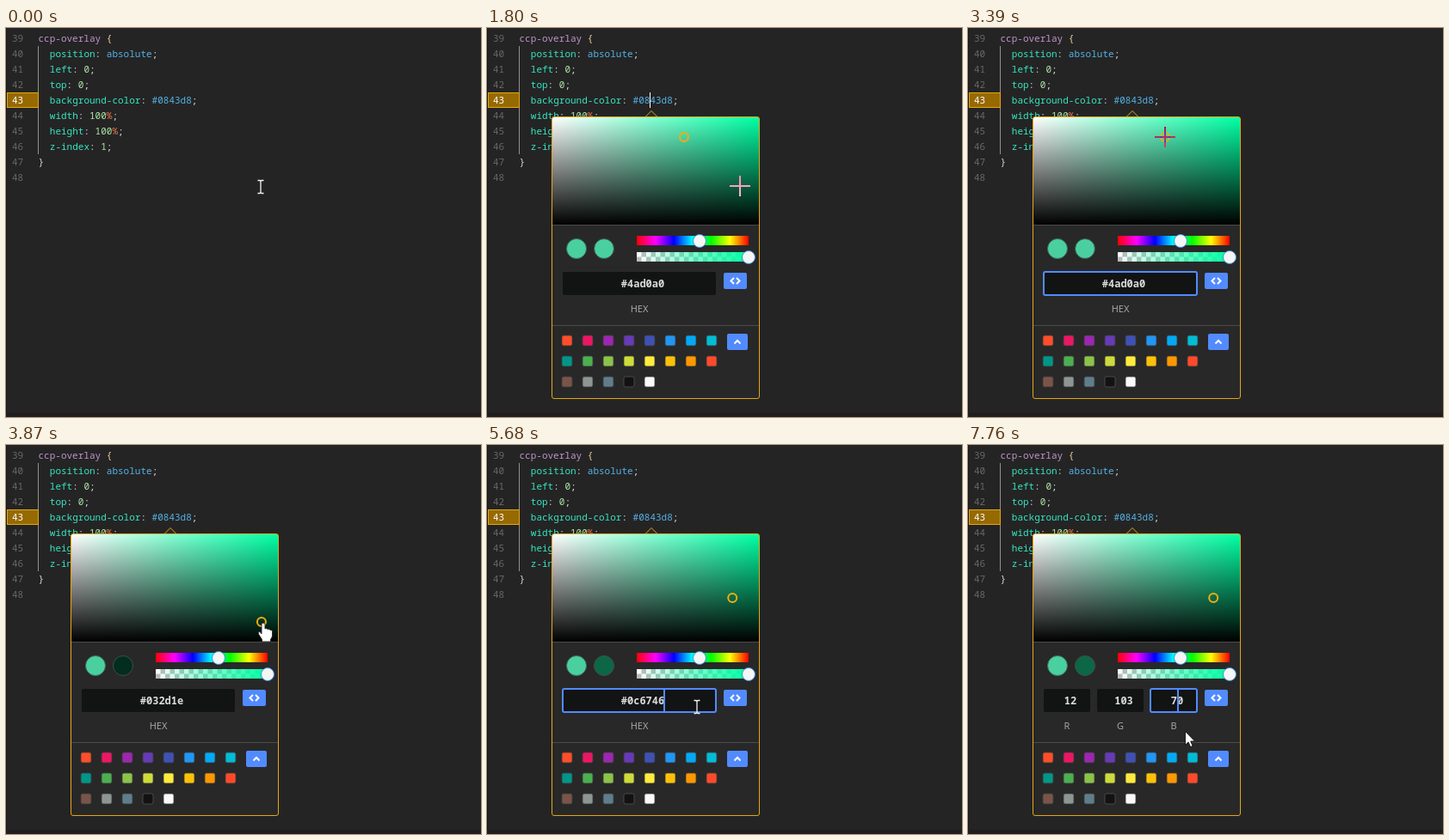
Recreate the animation shown at these times as an HTML page. Size 552 by 453 pixels, loop 8 s.

```html
<!DOCTYPE html>
<html lang="en">
<head>
<meta charset="utf-8">
<title>Colour picker</title>
<style>
  html, body { margin: 0; width: 100%; height: 100%; overflow: hidden; background: #242424; }
  svg { display: block; }
  text { white-space: pre; }
  .code { font: 500 11px "Noto Sans Mono", monospace; }
  .value { font: 600 12px "Noto Sans Mono", monospace; fill: #dcdcdc; text-anchor: middle; }
  .label { font: 11px "Noto Sans", sans-serif; fill: #a6a6a6; text-anchor: middle; }
  .field { fill: #121313; }
  .focus { fill: none; stroke: #528bff; stroke-width: 2; }
  .caret { fill: #528bff; }
  .button { fill: #528bff; }
  .icon { fill: none; stroke: #fff; stroke-width: 2; }
  .thumb { fill: #f6f6f6; stroke: #3c8edb; }
  #cross { stroke: #fff; stroke-width: 2; mix-blend-mode: difference; }
</style>
</head>
<body>
<svg id="stage" width="552" height="453" viewBox="0 0 552 453"></svg>
<script>
const LOOP = 8000;
const HUE = [0, 1, 0.6418];

// ---- markup helpers ----
const rect = (x, y, w, h, attrs = '') =>
  `<rect x="${x}" y="${y}" width="${w}" height="${h}" ${attrs}/>`;
const text = (x, y, cls, body, attrs = '') =>
  `<text x="${x}" y="${y}" class="${cls}" ${attrs}>${body}</text>`;
const span = (color, body) => `<tspan fill="${color}">${body}</tspan>`;
const stops = colors => colors.map((c, i) =>
  `<stop offset="${i / (colors.length - 1)}" stop-color="${c}"/>`).join('');
const gradient = (id, colors, down) =>
  `<linearGradient id="${id}" x2="${down ? 0 : 1}" y2="${down ? 1 : 0}">${stops(colors)}</linearGradient>`;

// ---- editor ----
const PLAIN = '#d4dce4', PROP = '#36e6c2', WORD = '#55b2e6', NUM = '#ade8a8', UNIT = '#f2764e';

function declaration(name, value) {
  const number = value.match(/^(\d+)(%?)$/);
  const shown = number ? span(NUM, number[1]) + span(UNIT, number[2]) : span(WORD, value);
  return span(PROP, name) + span(PLAIN, ': ') + shown + span(PLAIN, ';');
}

function editor() {
  const props = [['position', 'absolute'], ['left', '0'], ['top', '0'],
    ['background-color', '#0843d8'], ['width', '100%'], ['height', '100%'], ['z-index', '1']];
  let out = rect(0, 0, 552, 453, 'fill="#242424"') + rect(0, 0, 1, 453, 'fill="#171717"') +
    rect(0, 448, 552, 5, 'fill="#211d1f"') +
    rect(1.5, 75.5, 36, 17, 'fill="#966a00" stroke="#e5a616"');
  for (let i = 0; i < 10; i++)
    out += text(7, 16 + 18 * i, 'code', 39 + i, `fill="${i === 4 ? '#fff' : '#686868'}"`);
  out += text(37.5, 16, 'code', span('#c193cc', 'ccp-overlay') + span('#ecd5a0', ' {'));
  props.forEach((p, i) => out += text(50.8, 34 + 18 * i, 'code', declaration(...p)));
  out += text(37.5, 160, 'code', '}', `fill="${PLAIN}"`) +
    rect(37, 21, 1, 54, 'fill="#93908c"') + rect(37, 93, 1, 54, 'fill="#93908c"');
  return out + rect(189, 75, 1, 18, 'id="editCaret" fill="#fff"');
}

// ---- picker ----
const field = (x, w) => rect(x, 284, w, 27, 'class="field" rx="2"');
const focusRing = (id, x, w) => rect(x, 284, w, 27, `id="${id}" class="focus" rx="2"`);
const caret = (id, x) => rect(x, 285, 2, 25, `id="${id}" class="caret"`);

function picker() {
  const swatches = [
    '#ff4e2a #ec1763 #9c27b0 #673ab7 #3f51b5 #2196f3 #03a9f4 #00bcd4',
    '#009688 #4caf50 #8bc34a #cddc39 #ffeb3b #ffc107 #ff9800 #ff4a2a',
    '#795548 #8e9693 #607d8b #121212 #fafafa'];
  let out = '<path d="M184 103.5l7-7 7 7" fill="#282828" stroke="#e5a616"/>' +
    rect(75.5, 103.5, 241, 328, 'rx="2.5" fill="#282828"') +
    rect(76, 104, 240, 125, 'fill="url(#sat)"') + rect(76, 104, 240, 125, 'fill="url(#val)"') +
    rect(76, 229, 240, 1, 'fill="#4b4b4b"') + rect(76, 346, 240, 1, 'fill="#4b4b4b"') +
    rect(75.5, 103.5, 241, 328, 'rx="2.5" fill="none" stroke="#e5a616"') +
    '<circle id="ring" r="5" fill="none" stroke="#f2ae0c" stroke-width="2"/>' +
    '<circle cx="104" cy="257" r="11.5" fill="#4ad0a0" stroke="#3f6f5d"/>' +
    '<circle id="current" cx="136" cy="257" r="11.5" stroke="#3f4f49"/>' +
    rect(174, 242, 130, 11, 'fill="url(#hue)"') +
    rect(174, 261, 130, 11, 'fill="url(#check)"') + rect(174, 261, 130, 11, 'fill="url(#alpha)"') +
    '<circle class="thumb" cx="247" cy="248" r="7.5"/><circle class="thumb" cx="304" cy="267" r="7.5"/>';

  out += '<g id="hexMode">' + field(88, 178) + text(181, 302, 'value', '', 'id="hexText"') +
    text(177, 331, 'label', 'HEX') + focusRing('hexFocus', 88, 178) + caret('hexCaret', 205) + '</g>';

  out += '<g id="rgbMode">';
  [['R', 12], ['G', 103], ['B', 70]].forEach(([name, value], i) => {
    const x = 88 + 62 * i;
    out += field(x, 54) + text(x + 31, 302, 'value', value) + text(x + 27, 331, 'label', name);
  });
  out += focusRing('redFocus', 88, 54) + caret('redCaret', 125) +
    focusRing('blueFocus', 212, 54) + caret('blueCaret', 243) + '</g>';

  out += rect(275, 285, 27, 19, 'id="modeButton" class="button" rx="2"') +
    '<path class="icon" d="M287 291l-3.5 3.5 3.5 3.5M290 291l3.5 3.5-3.5 3.5"/>' +
    rect(279, 356, 24, 19, 'class="button" rx="2"') +
    '<path class="icon" d="M287.5 367.5l3.5-3.5 3.5 3.5"/>';

  swatches.forEach((row, r) => row.split(' ').forEach((color, c) =>
    out += rect(87 + 24 * c, 358 + 24 * r, 12, 12,
      `rx="2" fill="${color}" stroke="${color === '#121212' ? '#555' : '#3a3a3a'}" stroke-width=".8"`)));
  return `<g id="picker">${out}</g>`;
}

const cursors =
  `<path id="beam" fill="none" stroke="#f4f4f4" stroke-width="1.3"
    d="M-3.5-7.5h2.5l1 1 1-1h2.5M0-6.5v13M-3.5 7.5h2.5l1-1 1 1h2.5"/>
  <path id="cross" d="M-12 0h24M0-12v24"/>
  <path id="arrow" fill="#fff" stroke="#111" stroke-width=".9"
    d="M.5.5v15.8l3.6-3.4 2.5 5.7 2.5-1.1-2.4-5.5h4.9z"/>
  <path id="hand" fill="#fff" stroke="#222" stroke-width=".9"
    d="M-2 1.2Q0-1 2 1.2V7q2-1.2 3 .6 2-.9 3 .9 2.400-.6 2.500 1.600V15q0 2-2 4.200V22H-1.500v-2.500L-5.500 13.200q-1-2.600 1-2.600 1.200 0 2.500 2.300z"/>`;

document.getElementById('stage').innerHTML = '<defs>' +
  gradient('sat', ['#fff', '#00ffa4']) +
  gradient('val', ['#0000', '#000'], true) +
  gradient('hue', ['#f00', '#f0f', '#00f', '#0ff', '#0f0', '#ff0', '#f00']) +
  gradient('alpha', ['#00ffa400', '#00ffa4']) +
  '<pattern id="check" x="174" y="261" width="11" height="11" patternUnits="userSpaceOnUse">' +
  rect(0, 0, 11, 11, 'fill="#fff"') + '<path d="M5.500 0H11v5.500H0V11h5.500z" fill="#bbb"/></pattern></defs>' +
  editor() + picker() + cursors;

// ---- timeline ----
// Pointer moves: start, end, step count, then [step, x, y] points on the way.
const moves = [
  [0, 1, 1, [1, 296, 185]],
  [1800, 1801, 1, [1, 294, 184]],
  [2680, 3450, 13, [5, 244, 129], [7, 232, 122], [10, 228, 126], [13, 229, 128]],
  [3630, 3870, 5, [5, 299, 207]],
  [4050, 4110, 2, [2, 286, 178]],
  [4350, 4760, 7, [1, 286, 178], [4, 314, 236], [7, 292, 308]],
  [4950, 5320, 6, [2, 274, 340], [4, 252, 320], [6, 244, 305]],
  [5930, 6690, 13, [2, 262, 304], [3, 272, 300], [5, 286, 296], [8, 284, 297], [9, 272, 300], [13, 246, 299]],
  [6750, 7150, 5, [2, 244, 300], [3, 245, 306], [5, 252, 333]],
];
const kinds = [[0, 'beam'], [1800, 'cross'], [3630, 'hand'], [4050, 'cross'], [4350, 'hand'],
  [4418, 'cross'], [4550, 'arrow'], [5170, 'beam'], [6056, 'arrow'], [6120, 'hand'],
  [6436, 'arrow'], [6500, 'beam'], [7050, 'arrow']];
const visible = {
  editCaret: [[180, 610], [1000, 1360], [1800, 1920]],
  picker: [[1800, LOOP]],
  hexMode: [[1800, 6200]],
  rgbMode: [[6200, LOOP]],
  hexFocus: [[1920, 3450], [5680, 6200]],
  hexCaret: [[1920, 2300], [2680, 3100], [5680, 6110]],
  redFocus: [[6200, 6850]],
  redCaret: [[6200, 6630]],
  blueFocus: [[6850, LOOP]],
  blueCaret: [[6850, 7330], [7760, LOOP]],
};

const $ = id => document.getElementById(id);
const lerp = (a, b, p) => a + (b - a) * p;
const show = (id, on) => $(id).style.display = on ? '' : 'none';

function stepAt(t, start, end, count) {
  if (t < start) return 0;
  return t >= end ? count : 1 + Math.floor((t - start) / (end - start) * (count - 1) + 1e-6);
}

function pointerAt(t) {
  let pos = [296, 185];
  for (const [start, end, count, ...points] of moves) {
    const step = stepAt(t, start, end, count);
    if (!step) break;
    let from = [0, ...pos];
    for (const to of points) {
      const p = Math.min(1, (step - from[0]) / (to[0] - from[0]));
      pos = [lerp(from[1], to[1], p), lerp(from[2], to[2], p)];
      if (step <= to[0]) break;
      from = to;
    }
  }
  return pos;
}

function colorAt(t) {
  if (t >= 4350) return [0.8835, 0.4039];
  const p = stepAt(t, 3630, 3870, 5) / 5;
  return [lerp(0.6442, 0.9333, p), lerp(0.8157, 0.1765, p)];
}

const toHex = (s, v) => '#' + HUE.map(h =>
  Math.round(255 * v * (1 - s + s * h)).toString(16).padStart(2, '0')).join('');

function draw(t) {
  for (const id in visible) show(id, visible[id].some(([a, b]) => t >= a && t < b));

  const [s, v] = colorAt(t), hex = toHex(s, v);
  $('ring').setAttribute('cx', 77.6 + 235 * s);
  $('ring').setAttribute('cy', 127 + 123.6 * (0.8157 - v));
  $('current').setAttribute('fill', hex);
  $('hexText').textContent = hex;

  const [x, y] = pointerAt(t).map(Math.round);
  const kind = kinds.filter(k => t >= k[0]).pop()[1];
  for (const id of ['beam', 'cross', 'arrow', 'hand']) show(id, id === kind);
  $(kind).setAttribute('transform', `translate(${x} ${y})`);
  const hover = x > 270 && x < 303 && y > 284 && y < 305;
  $('modeButton').style.fill = hover ? '#6b9bff' : '';
}

const began = performance.now();
function tick() {
  draw((performance.now() - began) % LOOP);
  requestAnimationFrame(tick);
}
tick();
</script>
</body>
</html>
```
